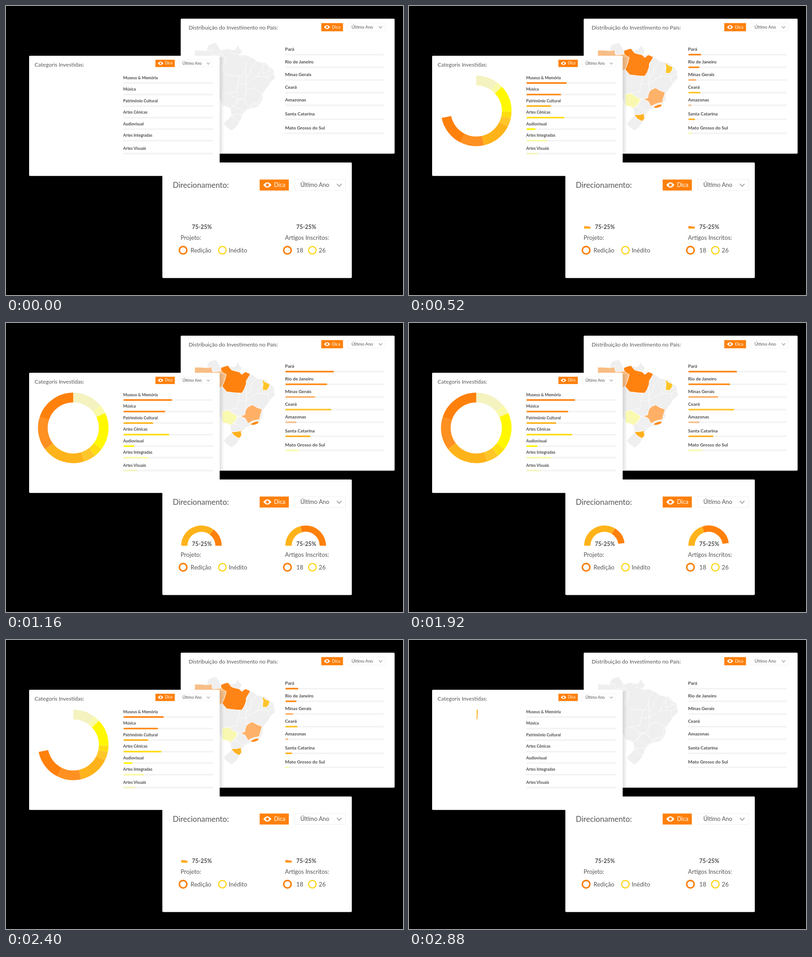
Animation of 876x639 px, one loop 2.92 s. Source, as an HTML page:

```html
<!DOCTYPE html>
<html lang="pt-BR">
<head>
<meta charset="utf-8">
<title>Painéis de investimento</title>
<style>
  html, body { margin: 0; height: 100%; overflow: hidden; background: #000; }
  svg { display: block; width: 876px; height: 639px; font-family: Lato, "Open Sans", sans-serif; fill: #555; }
  .b { font-weight: 700; fill: #4c4c4c; }
</style>
</head>
<body>
<svg id="stage" viewBox="0 0 876 639" xmlns="http://www.w3.org/2000/svg"></svg>
<script>
const LOOP = 2920, STEP = 40, OUT = 1920;
const ORANGE = '#ff800b', AMBER = '#ffb31a', YELLOW = '#fff800', CREAM = '#f9f9a8', PALE = '#f4f3c0', GREY = '#efefef';

const text = (x, y, size, s, cls = '') => `<text x="${x}" y="${y}" font-size="${size}" class="${cls}">${s}</text>`;
const rect = (x, y, w, h, fill, extra = '') => `<rect x="${x}" y="${y}" width="${w}" height="${h}" fill="${fill}" ${extra}/>`;
const panel = (x, y, w, h) => rect(x, y, w, h, '#fff', 'rx="2"');

const controls = (x, y, s) => `<g transform="translate(${x} ${y}) scale(${s})">
  ${rect(0, 0, 64.3, 24.3, ORANGE)}
  <path d="M8 12Q17 0.5 26 12Q17 23.5 8 12Z" fill="#fff"/>
  <circle cx="17" cy="12" r="3.2" fill="${ORANGE}"/>
  <text x="31.5" y="16" font-size="12.8" fill="#fff">Dica</text>
  ${rect(78, 0, 112, 24, '#fff', 'stroke="#eee"')}
  ${text(89.7, 16.3, 12.8, 'Último Ano')}
  <path d="M170.5 9.5l5 5.5l5-5.5" fill="none" stroke="#aaa" stroke-width="2.2"/>
</g>`;

// Bar lists: both share the lengths; the rows from `wide` on are spaced 3px further apart
const lengths = [107, 92, 65.5, 101, 24, 55, 31];
const arts = [['Museus &amp; Memória', ORANGE], ['Música', '#ff8c1a'], ['Patrimônio Cultural', AMBER],
  ['Artes Cênicas', '#ffdc10'], ['Audiovisual', YELLOW], ['Artes Integradas', CREAM], ['Artes Visuais', PALE]];

const rows = (list, x, y0, pitch, wide, w, size, cls) => list.map(([label, color], i) => {
  const y = y0 + pitch * i + 3 * Math.max(0, i - wide);
  return text(x, y - 8.3, size, label, 'b') + rect(x, y - 1.8, w, 3.6, '#f3f3f3', 'rx="1"') +
    rect(x + .8, y - 1.8, 0, 3.6, color, `rx="1.5" class="${cls}"`);
}).join('');

// Map: key points only; every edge gets a bend that depends on its midpoint, so neighbours agree
function rough(points) {
  const p = points.split(' ').map(s => s.split(',').map(Number));
  return 'M' + p.map(([x, y], i) => {
    if (!i) return `${x} ${y}`;
    const [px, py] = p[i - 1], mx = (x + px) / 2, my = (y + py) / 2;
    const bend = .08 * Math.hypot(x - px, y - py);
    return `${mx + bend * Math.sin(mx * 7 + my * 3)} ${my + bend * Math.cos(mx * 5 - my * 9)} ${x} ${y}`;
  }).join('L');
}

const states = [
  ['Pará', '#ff820f', '475,106 474,99 490,94 498,104 514,108 520,114 528,108 539,113 530,128 528,140 520,155 487,152 477,140 486,114 475,106'],
  ['Rio de Janeiro', '#ff8a14', '541,222 557,217 557,222 541,226 541,222'],
  ['Minas Gerais', '#ffb066', '513,206 527,203 530,190 544,181 565,191 559,213 534,222 528,211 513,206'],
  ['Ceará', '#ffc428', '565,124 582,135 575,149 566,149 565,124'],
  ['Amazonas', '#f8bd85', '416,110 416,98 442,99 454,97 456,108 475,106 486,114 477,140 460,152 416,110'],
  ['Santa Catarina', '#ffb01e', '497,241 519,238 520,248 514,255 497,241'],
  ['Mato Grosso do Sul', '#f9f9b0', '477,196 491,193 510,205 508,214 496,226 478,221 477,196']
];
const country = '416,110 416,98 442,99 446,87 463,81 473,98 490,94 505,97 512,86 521,100 514,108 528,108 539,113 554,122 572,125 592,142 594,160 579,177 567,193 567,205 556,222 530,231 523,238 519,250 498,276 480,260 497,243 495,228 478,221 466,190 466,110';
const borders = [
  '487,152 516,156 509,190 491,193', '528,140 529,172 530,190', '512,172 529,172 555,156 578,157 595,149',
  '553,121 540,136 538,152 529,159', '565,136 555,156', '575,145 593,143',
  '496,226 513,206', '503,222 523,234 541,222', '578,157 582,172'
];
const shapes = fill => states.map(([, color, p]) => `<path d="${rough(p)}Z" fill="${fill || color}"/>`).join('');
const map = `<g stroke="#fff" stroke-width="0.9" stroke-linejoin="round">
  <path d="${rough(country)}Z" fill="${GREY}"/>
  <path d="${borders.map(rough).join('')}" fill="none"/>
  ${shapes(GREY)}<g id="tint">${shapes()}</g></g>`;

// Rings: end angle of each segment in degrees, and its colour
const donut = [[50, PALE], [65, CREAM], [127, YELLOW], [142, '#ffdd12'],
  [162, '#ffc62a'], [233, AMBER], [288, '#ff9022'], [360, ORANGE]];
const gauge = split => [[split, AMBER], [180, ORANGE]];

function ring(cx, cy, r, width, start, segments, k) {
  if (k <= 0) return '';
  const point = deg => {
    const a = (start + deg * k - 90) * Math.PI / 180;
    return `${cx + r * Math.cos(a)} ${cy + r * Math.sin(a)}`;
  };
  let from = 0;
  return segments.map(([to, color]) => {
    const d = `M${point(from)}A${r} ${r} 0 0 1 ${point(to)}`;
    from = to;
    return `<path d="${d}" fill="none" stroke="${color}" stroke-width="${width}"/>`;
  }).join('');
}

// One block of the lower panel: share, title and two legend entries
const legend = (x, color, w, tx, label) =>
  `<circle cx="${x}" cy="540" r="8.3" fill="none" stroke="${color}" stroke-width="${w}"/>` + text(tx, 544.5, 13.2, label);
const share = (x, title, a, b, bx, ax = x + 22) =>
  text(x + 25, 492.5, 12.5, '75-25%', 'b') + text(x, 516.5, 13.2, title) +
  legend(x + 5.5, '#fa800f', 3.4, ax, a) + legend(bx, '#fdd516', 2.5, bx + 14, b);

const stage = document.getElementById('stage');
stage.innerHTML = `
  <defs><linearGradient id="shade">
    <stop offset="0" stop-color="#000" stop-opacity=".13"/><stop offset="1" stop-color="#000" stop-opacity="0"/>
  </linearGradient></defs>
  ${panel(385.5, 28, 472, 298.5)}
  ${text(403, 52, 12.1, 'Distribuição do Investimento no País:')}
  ${controls(695.7, 37.8, .745)}
  ${map}
  ${rows(states, 615.8, 107.5, 28, 4, 218, 10.1, 'state')}
  ${rect(471, 113, 10, 213, 'url(#shade)')}
  ${panel(51, 110, 420.5, 265.7)}
  ${text(63, 134, 12.1, 'Categoris Investidas:')}
  ${controls(329.7, 118.8, .665)}
  ${rows(arts, 258.5, 170.2, 25.5, 5, 198.5, 8.8, 'art')}
  ${panel(345, 346, 418, 255.5)}
  ${text(368, 402, 17, 'Direcionamento:')}
  ${controls(559.7, 383.7, 1)}
  <g id="rings"></g>
  ${share(385.3, 'Projeto:', 'Redição', 'Inédito', 477.5)}
  ${share(615.5, 'Artigos Inscritos:', '18', '26', 676, 640.5)}`;

const tint = document.getElementById('tint');
const rings = document.getElementById('rings');
const stateBars = stage.querySelectorAll('.state');
const artBars = stage.querySelectorAll('.art');

const part = (u, a, b) => Math.min(1, Math.max(0, (u - a) / (b - a)));
const smooth = x => x * x * (3 - 2 * x);
const cubic = x => x < .5 ? 4 * x ** 3 : 1 - 4 * (1 - x) ** 3;
const grow = (bars, k) => bars.forEach((bar, i) => bar.setAttribute('width', lengths[i] * k));

function draw(now) {
  const t = Math.floor(now % LOOP / STEP) * STEP;
  const u = t < OUT ? t : LOOP - t; // the exit mirrors the entrance
  tint.setAttribute('opacity', smooth(part(u, 70, 570)));
  grow(artBars, cubic(part(u, 0, 800)));
  grow(stateBars, cubic(part(u, 185, 1015)));
  const k = cubic(part(u, 330, 1190));
  rings.innerHTML =
    ring(148.4, 232, 67.2, 21.4, 0, donut, smooth(part(u, 0, 800))) +
    ring(431.2, 492.5, 37.8, 14, 270, gauge(127), k) +
    ring(661.2, 492.5, 37.8, 14, 270, gauge(75), k);
}

let start;
function frame(now) {
  start ??= now;
  draw(now - start);
  requestAnimationFrame(frame);
}
draw(0);
requestAnimationFrame(frame);
</script>
</body>
</html>
```
